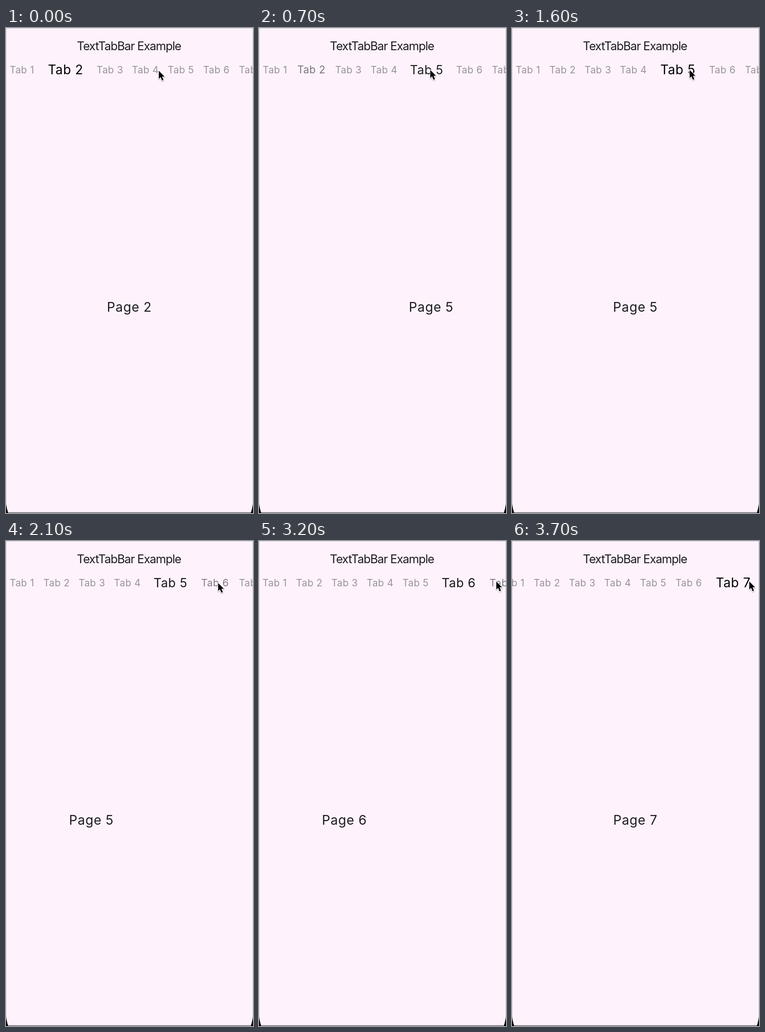
Recreate the animation shown at these times as an HTML page. Size 535x1048 px, loop 4.4 s.

```html
<!DOCTYPE html>
<html lang="en">
<head>
<meta charset="utf-8">
<title>Tab bar</title>
<style>
  html, body { margin: 0; width: 100%; height: 100%; overflow: hidden; background: #000; }
  svg { display: block; width: 100vw; height: 100vh; }
  text { font-family: Inter, Roboto, sans-serif; font-optical-sizing: none; text-anchor: middle; }
  .title { font-size: 25.4px; letter-spacing: -1.06px; fill: #1d1b20; }
  .page { font-size: 28.2px; letter-spacing: .75px; fill: #1d1b20; }
</style>
</head>
<body>
<svg viewBox="0 0 535 1048">
  <defs>
    <clipPath id="screen"><path d="M0 0H535V1024Q534 1038 530 1048H5Q1 1038 0 1024Z"/></clipPath>
    <filter id="shadow" x="-50%" y="-50%" width="200%" height="200%">
      <feDropShadow dx="0" dy="1.4" stdDeviation="1.2" flood-color="#000" flood-opacity=".35"/>
    </filter>
  </defs>
  <g clip-path="url(#screen)">
    <rect width="535" height="1048" fill="#fef3fd"/>
    <path d="M0 .5H535M.5 0V1048M534.5 0V1048" stroke="#cfc7cf" fill="none"/>
    <path d="M0 1047.2H535" stroke="#6b676b" stroke-width="1.6"/>
    <text class="title" x="266.3" y="47.5">TextTabBar Example</text>
    <g id="tabs"></g>
    <text class="page" y="613"></text>
    <text class="page" y="613"></text>
  </g>
  <path id="cursor" d="M0 0V17.3L3.9 13.7L7 21L10.2 19.7L7.1 12.5H12.4Z"
        stroke="#fff" stroke-width="2" paint-order="stroke" stroke-linejoin="round" filter="url(#shadow)"/>
</svg>
<script>
const LOOP = 4400, STEP = 100, WIDTH = 535;
const SLIDE = 500;         // length of one tab change
const GROWTH = 39;         // extra room taken by the selected tab
const SCROLL = 34;         // bar scroll needed to reveal the last tab
const SCROLL_DELAY = 20;
const GREY = [152, 147, 153];

const changes = [
  { start: 450, from: 2, to: 5 },
  { start: 2033, from: 5, to: 6 },
  { start: 3133, from: 6, to: 7 }
];
// start, end, then the pointer's new position
const moves = [
  [0, 300, 371, 90.8],
  [1500, 1900, 459.5, 90.8],
  [2150, 2550, 485, 89.2],
  [2600, 3000, 514, 87.5]
];

const clamp = v => Math.min(1, Math.max(0, v));
const mix = (a, b, k) => a + (b - a) * k;
const smooth = k => k * k * (3 - 2 * k);

function bezier(x1, y1, x2, y2) {
  const at = (a, b, s) => 3 * a * s * (1 - s) ** 2 + 3 * b * s * s * (1 - s) + s ** 3;
  return x => {
    if (x <= 0 || x >= 1) return clamp(x);
    let lo = 0, hi = 1;
    for (let i = 0; i < 24; i++) {
      const mid = (lo + hi) / 2;
      if (at(x1, x2, mid) < x) lo = mid; else hi = mid;
    }
    return at(y1, y2, lo);
  };
}
const ease = bezier(.25, .1, .25, 1);
const easeInOut = bezier(.42, 0, .58, 1);

const bar = document.getElementById('tabs');
const cursor = document.getElementById('cursor');
const pages = document.querySelectorAll('.page');
const tabs = Array.from({ length: 7 }, (_, i) => {
  const el = document.createElementNS('http://www.w3.org/2000/svg', 'text');
  el.textContent = `Tab ${i + 1}`;
  bar.append(el);
  return el;
});
const baseX = i => i === 0 ? 34.6 : i === 1 ? 109.6 : 186 + 76.9 * (i - 2);

function drawTabs(from, to, p, scroll) {
  let shift = -scroll;
  tabs.forEach((el, i) => {
    const w = i + 1 === from ? 1 - p : i + 1 === to ? p : 0;
    const size = mix(20.9, 27.8, w);
    el.setAttribute('x', baseX(i) + shift + GROWTH * w / 2);
    el.setAttribute('y', 90.3 + .364 * size);
    el.setAttribute('font-size', size);
    el.setAttribute('letter-spacing', mix(.45, .65, w));
    el.setAttribute('fill', `rgb(${GREY.map(c => Math.round(mix(c, 0, w)))})`);
    shift += GROWTH * w;
  });
}

function drawPages(from, to, p) {
  [from, to].forEach((n, i) => {
    pages[i].textContent = `Page ${n}`;
    pages[i].setAttribute('x', 267.2 + WIDTH * (i - p));
  });
}

function drawCursor(t) {
  let x = 331, y = 92.5;
  for (const [start, end, toX, toY] of moves) {
    const k = smooth(clamp((t - start) / (end - start)));
    x = mix(x, toX, k);
    y = mix(y, toY, k);
  }
  cursor.setAttribute('transform', `translate(${x} ${y})`);
}

function draw(t) {
  const { start, from, to } = changes.filter(c => c.start <= t).pop() || changes[0];
  const p = ease(clamp((t - start) / SLIDE));
  const reveal = easeInOut(clamp((t - start - SCROLL_DELAY) / SLIDE));
  drawTabs(from, to, p, to === 7 ? SCROLL * reveal : 0);
  drawPages(from, to, p);
  drawCursor(t);
}

// The picture advances ten times a second.
function tick() {
  draw(Math.floor(performance.now() % LOOP / STEP) * STEP);
  requestAnimationFrame(tick);
}
tick();
</script>
</body>
</html>
```
